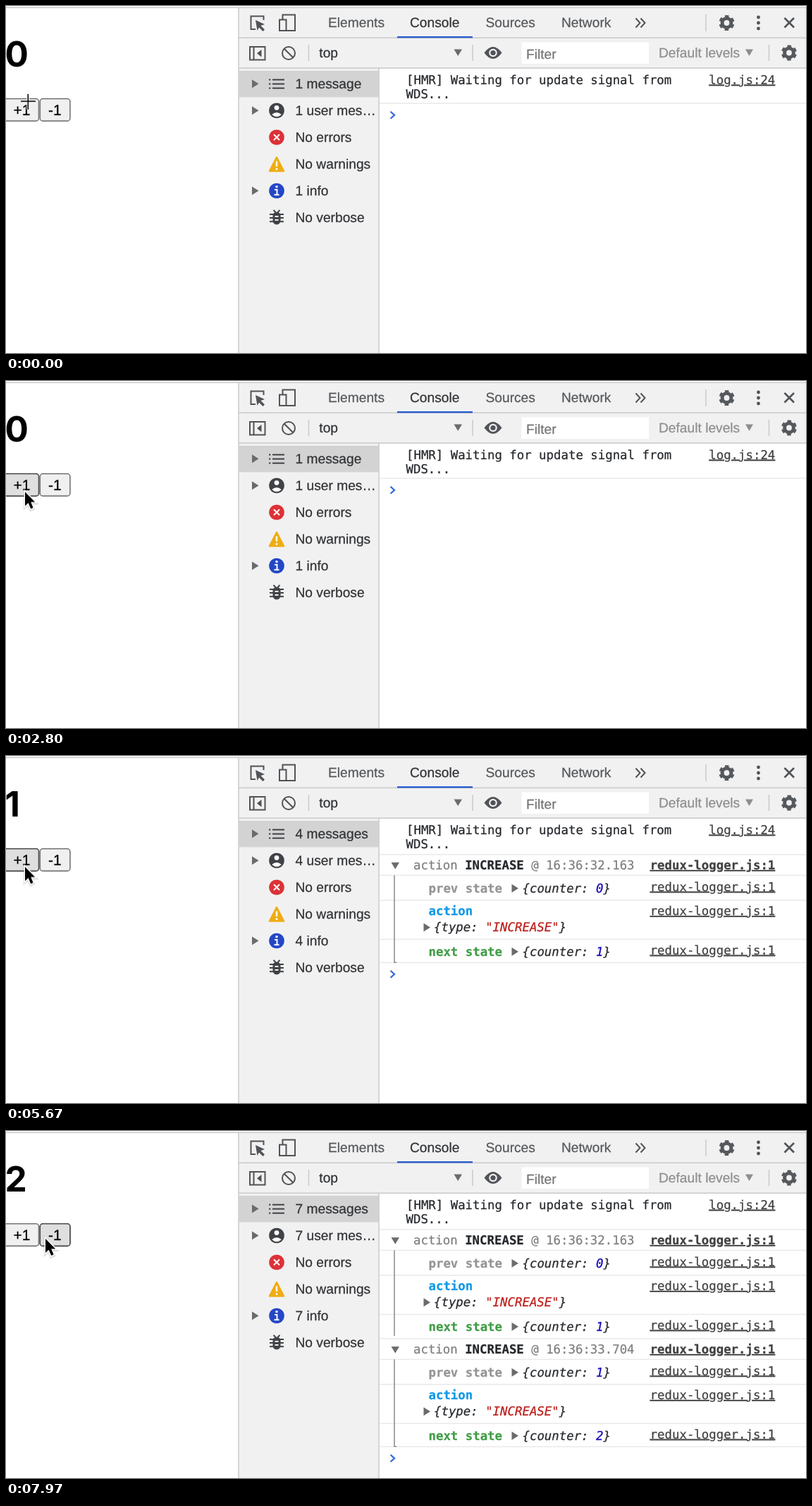
An HTML page that plays this animation: 1135 by 493 pixels, repeating every 8 s.

```html
<!DOCTYPE html>
<html lang="en">
<head>
<meta charset="utf-8">
<title>Counter with console log</title>
<style>
  html, body { margin: 0; width: 100%; height: 100%; overflow: hidden; background: #fff; }
  svg { display: block; width: 1135px; height: 493px; }
  text { white-space: pre; text-rendering: geometricPrecision; stroke-width: .25; }
  .ui { font: 19.2px "Liberation Sans", Arial, sans-serif; fill: #303235; stroke: #303235; }
  .tab { fill: #55585c; stroke: #55585c; }
  .mute { fill: #8e8e8e; stroke: #8e8e8e; }
  .btn { font: 21px "Liberation Sans", Arial, sans-serif; stroke: #000; }
  .count { font: 700 49.5px Inter, sans-serif; }
  .code { font: 17.36px "DejaVu Sans Mono", monospace; fill: #25282c; stroke: #25282c; }
  .link { text-anchor: end; text-decoration: underline; fill: #414141; stroke: #414141; }
  .bold { font-weight: 700; }
  .obj { font-style: italic; }
  .line { fill: none; stroke: #505357; stroke-width: 2; }
  .rule { stroke: #e9e9e9; stroke-width: 1.4; }
  .edge { stroke: #cacaca; stroke-width: 1.5; }
  .tri { fill: #6b6b6b; }

  #cursor { animation: move 8s infinite; }
  @keyframes move {
    0%, 8.75% { transform: translate(31px, 134.5px); animation-timing-function: ease-in-out; }
    14.125%, 29.6% { transform: translate(24.5px, 143.5px); animation-timing-function: ease-in-out; }
    34%, 81.5% { transform: translate(27px, 157.5px); animation-timing-function: ease-in; }
    82.875% { transform: translate(47.5px, 155px); animation-timing-function: ease-out; }
    87.5%, 100% { transform: translate(56px, 153px); }
  }
  #prompt { animation: drop 8s step-end infinite; }
  @keyframes drop {
    0% { transform: translateY(0); }
    52.9% { transform: translateY(155px); }
    72.1%, 100% { transform: translateY(310px); }
  }
</style>
</head>
<body>
<script>
const LOOP = 8000;
const CLICK = [4160, 5700];
const LOGGED = CLICK.map(t => t + 70);
const FLASH = 260;
let rules = '', ruleCount = 0;

// Shows the markup only between two times of the loop.
function during(from, to, markup) {
  const name = 'show' + ruleCount++;
  const pct = t => t / LOOP * 100 + '%';
  rules += `@keyframes ${name} {
    0% { opacity: 0 } ${pct(from)} { opacity: 1 }
    ${to < LOOP ? pct(to) + ' { opacity: 0 }' : ''} 100% { opacity: ${to < LOOP ? 0 : 1} } }\n`;
  return `<g style="animation: ${name} ${LOOP}ms step-end infinite">${markup}</g>`;
}

const text = (x, y, cls, s) => `<text x="${x}" y="${y}" class="${cls}">${s}</text>`;
const span = (cls, color, s) => `<tspan class="${cls}" style="fill:${color};stroke:${color}">${s}</tspan>`;
const rect = (x, y, w, h, fill, more = '') =>
  `<rect x="${x}" y="${y}" width="${w}" height="${h}" fill="${fill}" ${more}/>`;
const path = (d, cls, more = '') => `<path d="${d}" class="${cls}" ${more}/>`;
const disc = (x, y, r, fill) => `<circle cx="${x}" cy="${y}" r="${r}" fill="${fill}"/>`;
const right = (x, y) => path(`M${x} ${y - 6}l9.5 6l-9.5 6z`, 'tri');
const down = (x, y) => path(`M${x} ${y - 4.5}h11.5l-5.75 9.5z`, 'tri');
const rule = y => path(`M530 ${y}H1135`, 'rule');

function button(x, w, label, tx, hover) {
  return rect(x, 131.8, w, 31.6, hover ? '#dfdfdf' : '#f0f0f0',
    `rx="4" stroke="${hover ? '#4c4c4c' : '#757575'}" stroke-width="1.6"`) + text(tx, 155, 'btn', label);
}

// Six teeth, one of them pointing straight up.
function gear(x, y) {
  return `<g fill="none" stroke="#55585c">
    <circle cx="${x}" cy="${y}" r="6.4" stroke-width="5"/>
    <circle cx="${x}" cy="${y}" r="9.5" stroke-width="3.2" stroke-dasharray="5.4 4.55" stroke-dashoffset="7.7"/></g>`;
}

function page() {
  const plus = hover => button(-3, 49.5, '+1', 10.5, hover);
  const minus = hover => button(48.3, 42.6, '-1', 60, hover);
  const flash = t => during(t, t + FLASH,
    '<rect x="-1" y="37.5" width="328" height="125" fill="none" stroke="#7fbcbe" stroke-width="2.6"/>');
  const times = [0, ...CLICK, LOOP];
  return [0, 1, 2].map(n => during(times[n], times[n + 1], text(-1.5, 86, 'count', n))).join('')
    + plus(false) + minus(false)
    + during(2400, 6600, plus(true)) + during(6600, LOOP, minus(true))
    + CLICK.map(flash).join('');
}

function tabs() {
  return rect(330, 3, 805, 85, '#f1f1f1')
    + path('M0 2.2H1135M330 45.2H1135M330 88.2H1135', 'edge')
    + path('M993 12V36M429.5 55V78M662 55V78M1082.5 55V78', 'edge')
    + rect(555, 43, 107, 2.4, '#2c5fce')
    + path('M354 33H347.5V14.5H365.5V20', 'line')
    + path('M354 20l13 6l-5.5 2l5.5 5.5l-2.5 2.5l-5.5 -5.5l-2.5 4.5z', '', 'fill="#505357"')
    + path('M392.5 19V12.5H410V35H398M388 19.5h9.5v15.5h-9.5z', 'line')
    + text(457, 30, 'ui tab', 'Elements') + text(573, 30, 'ui', 'Console')
    + text(680.5, 30, 'ui tab', 'Sources') + text(788, 30, 'ui tab', 'Network')
    + path('M893.5 17.5l6 6.5l-6 6.5M900.5 17.5l6 6.5l-6 6.5', 'line')
    + gear(1022.5, 24) + [16, 24, 32].map(y => disc(1067.5, y, 2.4, '#505357')).join('')
    + path('M1104.5 17l13.5 13.5M1118 17l-13.5 13.5', 'line', 'style="stroke-width:2.6"');
}

function filters() {
  return path('M346 58h21.5v18.5h-21.5zM351.5 58v18.5', 'line')
    + path('M362.5 62v10.5l-6.5 -5.2z', '', 'fill="#505357"')
    + '<circle cx="401" cy="67" r="9" class="line"/>' + path('M394.7 60.7l12.6 12.6', 'line')
    + text(444.3, 73, 'ui', 'top') + down(635.5, 66)
    + path('M678.5 66.5q12.5 -17 25 0q-12.5 17 -25 0z', '', 'fill="#505357"')
    + disc(691, 66.5, 5.8, '#f1f1f1') + disc(691, 66.5, 3.6, '#505357')
    + rect(731.5, 51.5, 180.5, 30.5, '#fff')
    + text(738, 74.5, 'ui', span('', '#757575', 'Filter'))
    + text(926, 73, 'ui mute', 'Default levels')
    + path('M1049 61.5h11l-5.5 9.5z', '', 'fill="#8e8e8e"')
    + gear(1111, 66.5);
}

function sidebar() {
  const x = 384, dark = '#3f4246';
  const dots = [104.7, 110.7, 116.7];
  const icons =
    dots.map(y => rect(373, y - 1, 2.4, 2, dark) + rect(378, y - 1, 17, 2, dark)).join('')
    + disc(x, 148.5, 10.8, dark) + disc(x, 144.6, 3.4, '#fff')
    + path('M377.2 154.3q6.8 -6 13.6 0q-6.8 6 -13.6 0z', '', 'fill="#fff"')
    + disc(x, 186.5, 10.8, '#dc3237')
    + path('M380 182.5l8 8M388 182.5l-8 8', 'line', 'style="stroke:#fff"')
    + path('M384 215l10 19.5h-20z', '', 'fill="#efad13" stroke="#efad13" stroke-width="2.5" stroke-linejoin="round"')
    + path('M384 220.5v7.5M384 230.3v2.6', 'line', 'style="stroke:#fff;stroke-width:2.5"')
    + disc(x, 262.5, 10.8, '#2347c5') + disc(x, 256.8, 1.8, '#fff')
    + path('M381 261h3.5v7M380.5 268.3h7', 'line', 'style="stroke:#fff"')
    + rect(378.5, 292.5, 11, 18, dark, 'rx="5.5"')
    + path('M374 296h20M374 301h20M374 306.3h20M379.5 290l3 3M388.5 290l-3 3', 'line', `style="stroke:${dark}"`)
    + path('M381.5 299h5M381.5 304h5', 'line', 'style="stroke:#f1f1f1;stroke-width:1.8"');
  const totals = n => text(410.5, 117, 'ui', n + (n > 1 ? ' messages' : ' message'))
    + text(410.5, 155, 'ui', n + ' user mes…') + text(410.5, 269, 'ui', n + ' info');
  const steps = [[1, 0], [2, CLICK[0]], [4, LOGGED[0]], [5, CLICK[1]], [7, LOGGED[1]], [0, LOOP]];
  return rect(330, 89, 199, 404, '#f1f1f1') + rect(331, 92, 198, 37.5, '#d3d3d3')
    + path('M529 88V493M330 3V493', 'edge') + icons
    + right(349, 110.5) + right(349, 148.5) + right(349, 262.5)
    + steps.slice(0, -1).map(([n, t], i) => during(t, steps[i + 1][1], totals(n))).join('')
    + text(410.5, 193, 'ui', 'No errors') + text(410.5, 231, 'ui', 'No warnings')
    + text(410.5, 307, 'ui', 'No verbose');
}

function group(i, time) {
  const link = (y, cls = '') => text(1091.3, y, 'code link ' + cls, 'redux-logger.js:1');
  const state = (y, label, color, n) => text(599.5, y, 'code bold', span('', color, label))
    + right(717.5, y - 6)
    + text(732.5, y, 'code obj', `{counter: ${span('', '#1608b8', n)}}`);
  const gray = '#7f7f7f';
  return during(LOGGED[i], LOOP, `<g transform="translate(0 ${i * 155})">`
    + rect(531, 136, 604, 5, '#fff')
    + [140, 169.5, 205, 260.5, 293.5].map(rule).join('')
    + path('M554 293.3H551V169.5', '', 'fill="none" stroke="#8b8b8b" stroke-width="1.5"')
    + down(546.5, 155.8)
    + text(578, 161, 'code', span('', gray, 'action ') + span('bold', '#25282c', 'INCREASE') + span('', gray, ' @ ' + time))
    + link(161, 'bold')
    + state(194, 'prev state', '#949494', i) + link(191.5)
    + text(599.5, 226, 'code bold', span('', '#0f98e6', 'action')) + link(226)
    + right(592.5, 243.5)
    + text(607, 249, 'code obj', `{type: ${span('', '#bd1c18', '"INCREASE"')}}`)
    + state(284, 'next state', '#409d46', i + 1) + link(281.7)
    + '</g>');
}

function log() {
  return text(568, 110.5, 'code', '[HMR] Waiting for update signal from')
    + text(567.5, 131, 'code', 'WDS...') + text(1091.3, 110.7, 'code link', 'log.js:24')
    + rule(138.3)
    + group(0, '16:36:32.163') + group(1, '16:36:33.704')
    + path('M545.5 150l5.5 5l-5.5 5', 'line', 'id="prompt" style="stroke:#3569d4;stroke-width:2.3"');
}

function pointer() {
  const cross = 'M21 135.3H42M31.3 125V147';
  const arrow = 'M0 0V20L4.6 15.8L8.2 24L11.6 22.5L8.2 14.6H14.2Z';
  return during(0, 300, path(cross, 'line', 'style="stroke:#fff;stroke-width:4.5;stroke-opacity:.75"')
      + path(cross, 'line', 'style="stroke:#111;stroke-width:1.7"'))
    + during(300, LOOP, '<g id="cursor">'
      + path(arrow, '', 'transform="translate(0 1)" fill="none" stroke="#000" stroke-opacity=".16" stroke-width="4.5"')
      + path(arrow, '', 'fill="#000" stroke="#fff" stroke-width="3" paint-order="stroke"') + '</g>');
}

const scene = page() + tabs() + filters() + sidebar() + log() + pointer();
const sheet = document.createElement('style');
sheet.textContent = rules;
document.head.append(sheet);
document.body.innerHTML = `<svg viewBox="0 0 1135 493">${scene}</svg>`;
</script>
</body>
</html>
```
